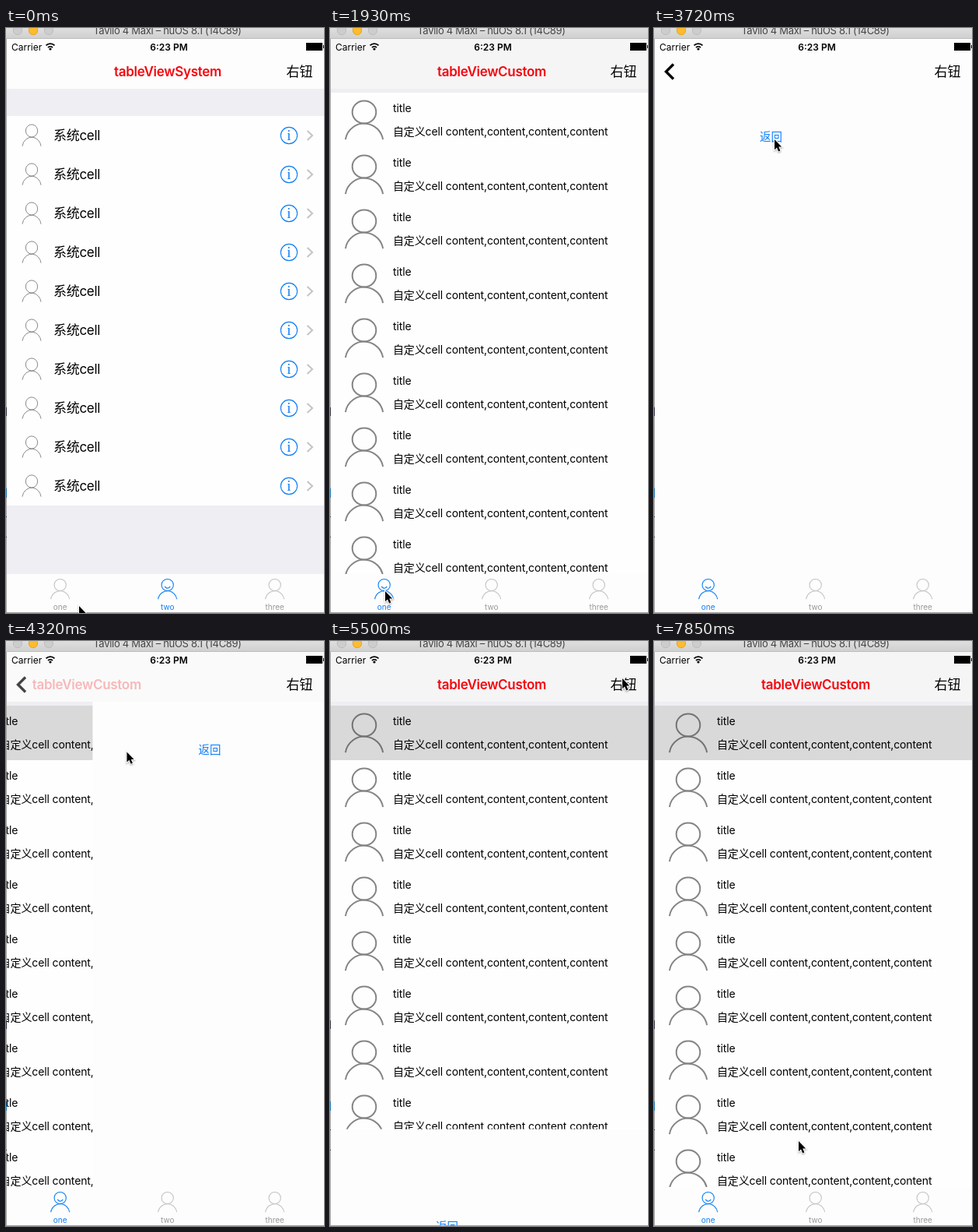
An HTML page with a canvas for the animation above (8 s loop, 409x751 px).

```html
<!DOCTYPE html>
<html lang="zh-CN">
<head>
<meta charset="utf-8">
<title>Tab and table demo</title>
<style>
  html, body { margin: 0; width: 100%; height: 100%; overflow: hidden; background: #fff; }
  canvas { display: block; }
</style>
</head>
<body>
<canvas id="stage" width="409" height="751"></canvas>
<script>
const W = 409, H = 751, LOOP = 8000, STEP = 148;
const NAV_TOP = 14, NAV_END = 78, TABS_TOP = 701;
const BLUE = '#0f7ef5', RED = '#f5050c', WHITE = '#fdfdfd', PALE = '#eeeef3';
const ctx = document.getElementById('stage').getContext('2d');

// Pointer stops: step, x, y
const POINTER = [
  [0, 94, 742], [3, 351, 725], [6, 351, 725], [11, 71, 723], [14, 71, 723],
  [18, 156, 140], [22, 156, 140], [25, 155, 143], [28, 155, 143], [32, 158, 139],
  [36, 376, 48], [38, 376, 48], [43, 151, 137], [45, 151, 137], [53, 186, 642]
];

const easeOut = p => 1 - (1 - p) ** 2;
const progress = (k, start, length = 3.4) =>
  easeOut(Math.min(1, Math.max(0, (k - start) / length)));

function rect(x, y, w, h, color) {
  ctx.fillStyle = color;
  ctx.fillRect(x, y, w, h);
}

function text(str, x, y, size, { color = '#000', weight = 400, align = 'left', spacing = 0 } = {}) {
  ctx.font = `${weight} ${size}px Inter, "Noto Sans CJK SC", "Noto Sans CJK", sans-serif`;
  ctx.letterSpacing = spacing + 'px';
  ctx.textAlign = align;
  ctx.fillStyle = color;
  ctx.fillText(str, x, y);
}

function stroke(color, width, build) {
  ctx.strokeStyle = color;
  ctx.lineWidth = width;
  ctx.beginPath();
  build();
  ctx.stroke();
}

function polyline(color, width, ...points) {
  stroke(color, width, () => points.forEach(p => ctx.lineTo(...p)));
}

function dot(x, y, r, color) {
  ctx.fillStyle = color;
  ctx.beginPath();
  ctx.arc(x, y, r, 0, 7);
  ctx.fill();
}

function layer(dx, dy, alpha, draw) {
  ctx.save();
  ctx.translate(dx, dy);
  ctx.globalAlpha *= alpha;
  draw();
  ctx.restore();
}

function clipped(x, y, w, h, draw) {
  ctx.save();
  ctx.beginPath();
  ctx.rect(x, y, w, h);
  ctx.clip();
  draw();
  ctx.restore();
}

// Head circle centred on x, y with round shoulders below
function person(x, y, sx, sy, color, width) {
  stroke(color, width, () => ctx.ellipse(x, y, 15.3 * sx, 14.4 * sy, 0, 0, 7));
  stroke(color, width, () => ctx.ellipse(x, y + 39 * sy, 24.4 * sx, 24.4 * sy, 0, Math.PI + 0.16, -0.16));
}

function systemTable() {
  rect(0, NAV_END, W, TABS_TOP - NAV_END, PALE);
  rect(0, 113, W, 500, '#fefefe');
  for (let y = 138; y < 600; y += 50) {
    person(33, y - 6, 0.5, 0.56, '#8a8a8a', 1);
    text('系统cell', 61, y + 6, 17, { spacing: -0.3 });
    stroke(BLUE, 1.1, () => ctx.arc(364, y, 10.6, 0, 7));
    ctx.font = '19px "Liberation Serif", serif';
    ctx.letterSpacing = '0px';
    ctx.textAlign = 'center';
    ctx.fillStyle = BLUE;
    ctx.fillText('i', 364, y + 6);
    polyline('#c4c4c8', 2, [387.5, y - 6], [394, y], [387.5, y + 6]);
  }
}

function collection() {
  rect(0, NAV_END, W, TABS_TOP - NAV_END, '#fff');
  for (let y = 83; y < 600; y += 155)
    for (const x of [8, 211]) rect(x, y, 197, 150, '#a9a9a9');
}

function customTable(selected) {
  rect(0, NAV_END, W, TABS_TOP - NAV_END, '#fefefe');
  rect(0, NAV_END, W, 5, PALE);
  if (selected) rect(0, 83, W, 70, '#d9d9d9');
  for (let y = 83; y < TABS_TOP; y += 70) {
    person(44, y + 25, 1, 1, selected && y === 83 ? '#747474' : '#858585', 2);
    text('title', 81, y + 25, 14, { spacing: -0.13 });
    text('自定义cell content,content,content,content', 81, y + 55, 14, { spacing: -0.13 });
  }
}

function backButton(pressed) {
  layer(0, 0, pressed ? 0.25 : 1, () =>
    text('返回', 150.5, 144.5, 14.5, { color: BLUE, align: 'center' }));
}

const navTitle = str => text(str, 208, 62, 17,
  { color: RED, weight: 600, align: 'center', spacing: -0.3 });

function tabBar(active, color) {
  rect(0, TABS_TOP, W, H - TABS_TOP, color);
  ['one', 'two', 'three'].forEach((name, i) => {
    const x = 69.7 + i * 138, on = i === active;
    person(x, 715, 0.5, 0.52, on ? BLUE : '#c3c3c3', 1.1);
    if (on) stroke(BLUE, 1.1, () => ctx.arc(x, 715.5, 3.6, 0.35, Math.PI - 0.35));
    text(name, x, 746.5, 10, { color: on ? BLUE : '#999', align: 'center' });
  });
}

function statusBar() {
  text('Carrier', 7, 28.5, 12);
  text('6:23 PM', 209.5, 28.5, 12, { weight: 600, align: 'center' });
  for (const r of [4.2, 7.8])
    stroke('#000', 1.8, () => ctx.arc(57, 28, r, -Math.PI * 0.75, -Math.PI * 0.25));
  dot(57, 27, 1.6, '#000');
  rect(386, 19, 21, 10, '#000');
  rect(408, 22, 1, 4, '#000');
}

function windowFrame() {
  const shade = ctx.createLinearGradient(0, 0, 0, 13);
  shade.addColorStop(0, '#dedede');
  shade.addColorStop(1, '#d0d0d0');
  rect(0, 0, W, 13, shade);
  rect(0, 13, W, 1, '#bdbdbd');
  for (const x of [15, 35, 55]) {
    const yellow = x === 35;
    dot(x, 3, 6, yellow ? '#fdbc2e' : '#cdcdcd');
    stroke(yellow ? '#dfa023' : '#b9b9b9', 0.8, () => ctx.arc(x, 3, 5.7, 0, 7));
  }
  text('Tavilo 4 Maxi – nuOS 8.1 (14C89)', 207.5, 8, 13, { color: '#454545', align: 'center', spacing: -0.3 });
  rect(0, 14, 1, H - 14, '#a6a6a6');
  rect(0, 487, 1, 11, '#334');
  rect(0, 591, 1, 12, '#1478b4');
  rect(0, 627, 1, 1, '#333');
  rect(0, 653, 1, 1, '#333');
  rect(0, 750, W, 1, '#a0a0a0');
}

function pointer(k) {
  let i = POINTER.findIndex(p => p[0] > k);
  if (i < 0) i = POINTER.length;
  const a = POINTER[i - 1], b = POINTER[i] || a;
  const p = a === b ? 0 : (k - a[0]) / (b[0] - a[0]);
  const e = p * p * (3 - 2 * p);
  layer(a[1] + (b[1] - a[1]) * e, a[2] + (b[2] - a[2]) * e, 1, () => {
    const arrow = new Path2D('M0 0V13.2L3 10.4L5.2 15.4L7.4 14.4L5.3 9.6H9.2Z');
    ctx.shadowColor = 'rgba(0,0,0,.35)';
    ctx.shadowBlur = 2;
    ctx.shadowOffsetY = 1;
    ctx.strokeStyle = '#fff';
    ctx.lineWidth = 2;
    ctx.stroke(arrow);
    ctx.shadowColor = 'transparent';
    ctx.fillStyle = '#000';
    ctx.fill(arrow);
  });
}

function customTab(k) {
  const push = progress(k, 18.5) - progress(k, 28.5);
  clipped(0, NAV_END, W, TABS_TOP - NAV_END, () => {
    layer(-0.3 * W * push, 0, 1, () => customTable(k >= 18));
    if (push > 0) layer(W * (1 - push), 0, 1, () => {
      rect(0, NAV_END, W, H, WHITE);
      backButton(k >= 27 && k < 29);
    });
  });
  rect(0, NAV_TOP, W, NAV_END - NAV_TOP, '#f5f5f6');
  layer(0, 0, push, () => {
    rect(0, NAV_TOP, W, NAV_END - NAV_TOP, WHITE);
    polyline('#000', 3.4, [25, 46.5], [15.5, 56], [25, 65.5]);
  });
  layer(-0.35 * W * push, 0, 1 - push, () => navTitle('tableViewCustom'));
}

function draw(k) {
  rect(0, 0, W, H, WHITE);
  if (k < 5) {
    systemTable();
    navTitle('tableViewSystem');
  } else if (k < 12) {
    collection();
    navTitle('collectionView');
  } else customTab(k);
  text('右钮', 377.5, 62, 17, { weight: 500, align: 'center' });

  if (k < 5) tabBar(1, WHITE);
  else if (k < 12) tabBar(2, '#e8e8e8');
  else tabBar(0, WHITE);

  const modal = progress(k, 36.7) - progress(k, 44.5);
  if (modal > 0) layer(0, (H - NAV_TOP) * (1 - modal), 1, () => {
    rect(0, NAV_TOP, W, H, WHITE);
    backButton(k >= 43);
  });
  statusBar();
  windowFrame();
  pointer(k);
}

function frame() {
  draw(Math.min(53, Math.floor((performance.now() % LOOP) / STEP)));
  requestAnimationFrame(frame);
}
frame();
</script>
</body>
</html>
```
